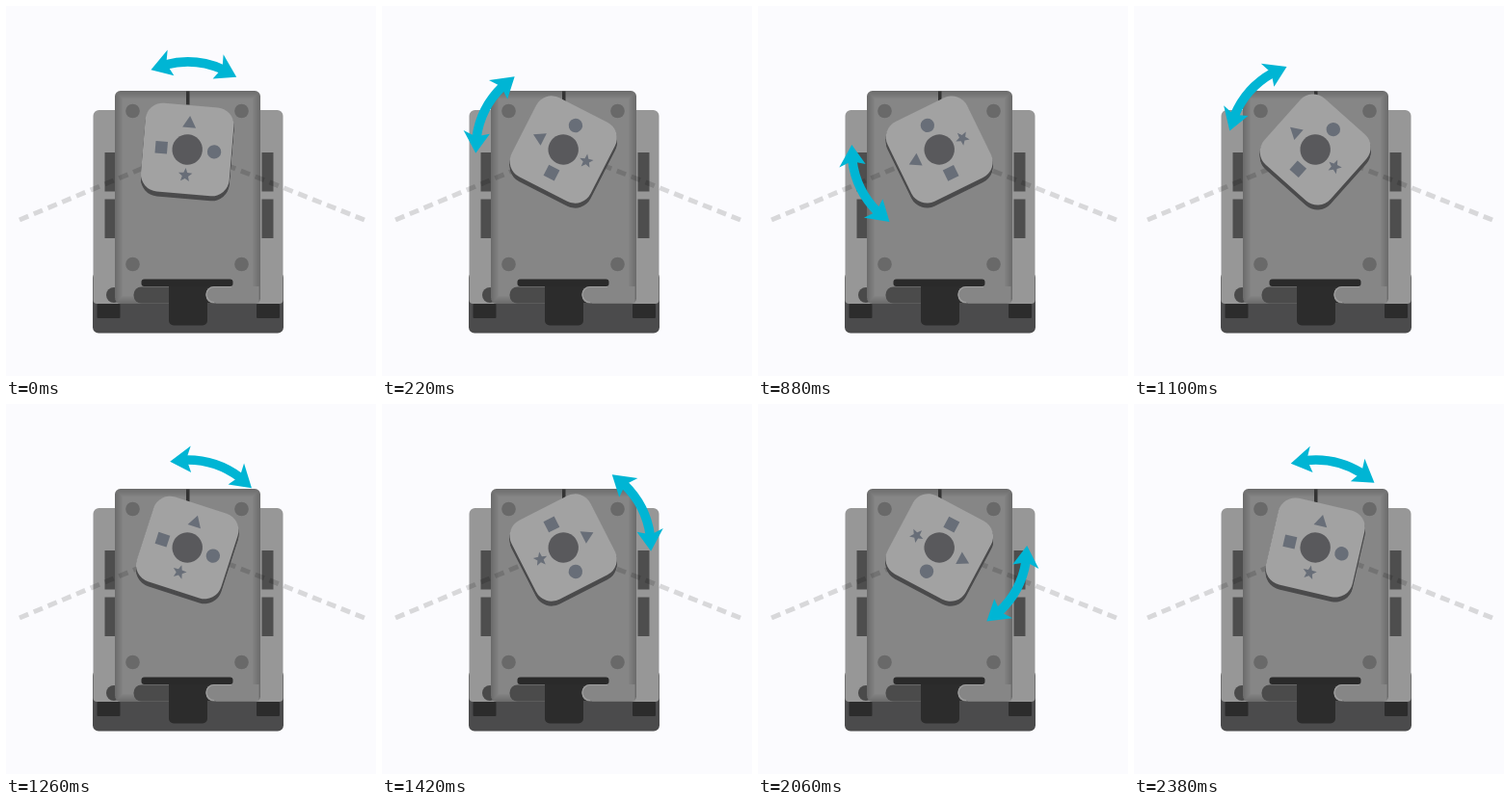
These frames come from a looping animation (384 by 384 pixels, 2400 ms). An HTML page with a canvas:

```html
<!DOCTYPE html>
<html lang="en">
<head>
<meta charset="utf-8">
<title>Rotating dial</title>
<style>
  html, body { margin: 0; width: 100%; height: 100%; overflow: hidden; background: #fbfbfe; }
  canvas { display: block; width: 384px; height: 384px; }
</style>
</head>
<body>
<canvas id="stage" width="384" height="384"></canvas>
<script>
const ctx = document.getElementById('stage').getContext('2d');
const LOOP = 2400, HALF = 1200, STEP = 20, RISE_START = 860, SWING = 118;
const CX = 188.2, CY = 149;
const RAD = Math.PI / 180;

// cubic-bezier(.25, .1, .25, 1)
function ease(p) {
  let lo = 0, hi = 1;
  for (let i = 0; i < 30; i++) {
    const u = (lo + hi) / 2;
    if (0.75 * u * (1 - u) + u ** 3 < p) lo = u; else hi = u;
  }
  const u = lo, v = 1 - u;
  return 0.3 * v * v * u + 3 * v * u * u + u ** 3;
}

function dialAngle(t) {
  const q = (t - RISE_START + LOOP) % LOOP;
  const turn = SWING * (2 * ease((q % HALF) / HALF) - 1);
  return (q < HALF ? turn : -turn) * RAD;
}

function box(x, y, w, h, r, fill) {
  ctx.fillStyle = fill;
  ctx.beginPath();
  ctx.roundRect(x, y, w, h, r);
  ctx.fill();
}

function disc(x, y, r, fill) {
  ctx.fillStyle = fill;
  ctx.beginPath();
  ctx.arc(x, y, r, 0, 2 * Math.PI);
  ctx.fill();
}

function polygon(points, fill) {
  ctx.fillStyle = fill;
  ctx.beginPath();
  points.forEach(([x, y]) => ctx.lineTo(x, y));
  ctx.closePath();
  ctx.fill();
}

function polar(radius, degrees) {
  return [radius * Math.sin(degrees * RAD), -radius * Math.cos(degrees * RAD)];
}

function rotated(y, angle, draw) {
  ctx.save();
  ctx.translate(CX, y);
  ctx.rotate(angle);
  draw();
  ctx.restore();
}

// Darkens the plate towards its rim.
function plateShade() {
  ctx.save();
  ctx.beginPath();
  ctx.roundRect(113, 88, 151, 221, 6);
  ctx.clip();
  for (let i = 0; i < 8; i++) {
    ctx.strokeStyle = 'rgba(50,52,46,0.045)';
    ctx.lineWidth = 2 + i * 2;
    ctx.strokeRect(113, 88, 151, 221);
  }
  ctx.restore();
}

function drawDevice() {
  box(90, 276, 198, 63.5, 6, '#4b4b4c');
  box(90.5, 108, 197, 201, [6, 6, 4, 4], '#979797');
  for (const x of [94.5, 260]) box(x, 309, 24, 15, 1, '#2c2c2c');
  for (const x of [102.5, 265.5]) {
    for (const y of [152, 200.5]) box(x, y, 12, 40.5, 0, '#4e4e4e');
  }
  disc(112, 300, 8, '#4a4a4a');
  box(113, 88, 151, 221, 6, '#868686');
  plateShade();
  for (const x of [131.5, 244.5]) {
    for (const y of [109, 268]) disc(x, y, 7.3, '#696969');
  }
  box(187, 88.5, 3.5, 14, 0, '#333333');

  box(132.5, 291.5, 48, 17, 8, '#4b4b4b');
  box(169, 289, 40, 42.5, [0, 0, 5, 5], '#2c2c2c');
  box(200, 289, 18, 19.5, 0, '#2c2c2c');
  box(207.5, 291, 55, 17.5, [8, 0, 0, 8], '#868686');
  ctx.strokeStyle = '#a0a0a0';
  ctx.lineWidth = 1.2;
  ctx.beginPath();
  ctx.moveTo(234, 291.5);
  ctx.lineTo(216, 291.5);
  ctx.arc(216, 299.5, 8, -Math.PI / 2, Math.PI / 2, true);
  ctx.stroke();
  box(140.5, 283.5, 95, 7.5, 3, '#2a2a2a');
}

function drawRays() {
  ctx.strokeStyle = 'rgba(0,0,0,0.14)';
  ctx.lineWidth = 5;
  ctx.setLineDash([10, 6]);
  for (const x of [14, 372]) {
    ctx.beginPath();
    ctx.moveTo(x, 222);
    ctx.lineTo(CX, CY);
    ctx.stroke();
  }
  ctx.setLineDash([]);
}

function drawArrow() {
  const cyan = '#00b5d4';
  ctx.strokeStyle = cyan;
  ctx.lineWidth = 9.5;
  ctx.beginPath();
  ctx.arc(0, 0, 91, -109 * RAD, -71 * RAD);
  ctx.stroke();
  for (const side of [-1, 1]) {
    polygon([polar(91, 29.3 * side), polar(105.5, 16 * side),
             polar(92, 18.5 * side), polar(78, 15 * side)], cyan);
  }
}

function drawSymbols() {
  const ink = '#686e78';
  polygon([[0, -35], [7, -23], [-7, -23]], ink);
  disc(28, 0, 7.2, ink);
  box(-33.3, -6.2, 12.5, 12.5, 0, ink);
  const star = Array.from({ length: 10 }, (_, i) => {
    const [x, y] = polar(i % 2 ? 3.3 : 7.6, i * 36);
    return [x, y + 26.7];
  });
  polygon(star, ink);
}

function drawDial(angle) {
  const face = fill => box(-46, -46, 92, 92, 18, fill);
  for (let depth = 5; depth > 0; depth--) {
    rotated(CY + depth, angle, () => face('#4b4b4c'));
  }
  rotated(CY, angle, () => {
    face('#a2a2a2');
    drawSymbols();
    disc(0, 0, 15.7, '#59595c');
  });
}

function render(t) {
  const angle = dialAngle(t);
  ctx.fillStyle = '#fbfbfe';
  ctx.fillRect(0, 0, 384, 384);
  drawDevice();
  drawRays();
  drawDial(angle);
  rotated(CY, angle, drawArrow);
}

let start;
function tick(now) {
  start ??= now;
  const t = (now - start) % LOOP;
  render(Math.floor(t / STEP) * STEP);
  requestAnimationFrame(tick);
}
render(0);
requestAnimationFrame(tick);
</script>
</body>
</html>
```
